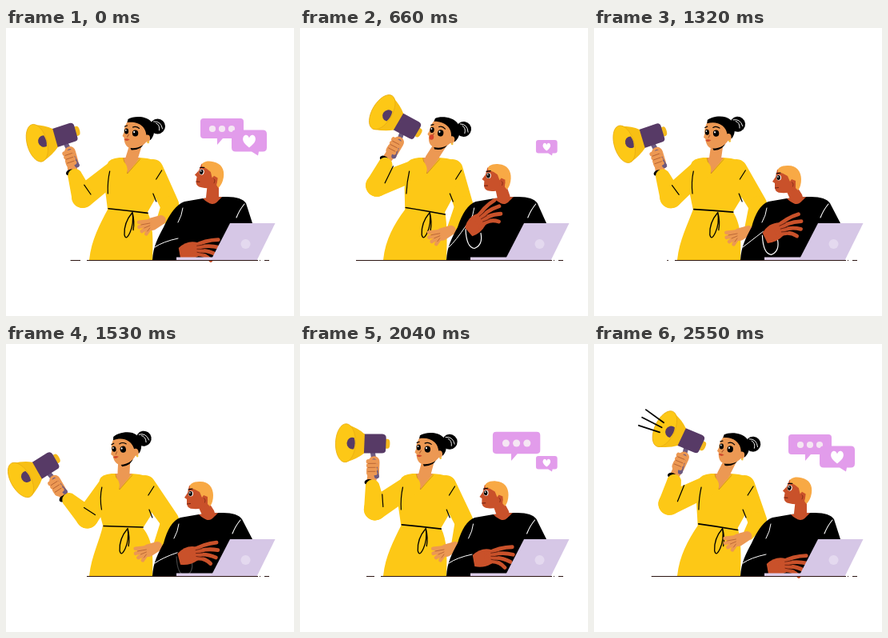
These frames come from a looping animation (360 px wide and 360 px high, 2.58 s). An HTML page:

```html
<!DOCTYPE html>
<html lang="en">
<head>
<meta charset="utf-8">
<title>Announcement</title>
<style>
html, body { margin: 0; width: 100%; height: 100%; overflow: hidden; background: #fff; }
svg { display: block; width: 100vw; height: 100vh; }
</style>
</head>
<body>
<svg id="stage" viewBox="0 0 360 360" stroke-linecap="round" stroke-linejoin="round"></svg>
<script>
const LOOP = 2580, STEP = 30, RAD = Math.PI / 180;
const INK = '#000', YELLOW = '#fdc816', PURPLE = '#573a66', SKIN = '#ec9853', FOLD = '#a8552b',
  RUST = '#c9512a', BLOND = '#f8a945', LILAC = '#d6c7e6', PINK = '#e29ceb';

// timing
const part = (t, a, b) => Math.min(1, Math.max(0, (t - a) / (b - a)));
const ramp = (t, a, b) => { const u = part(t, a, b); return u * u * (3 - 2 * u); };
const pop = u => 1 + 2.7 * (u - 1) ** 3 + 1.7 * (u - 1) ** 2;
const inOut = (t, out, gone, back, full) =>
  t < gone ? pop(1 - part(t, out, gone)) : pop(part(t, back, full));

// arm: -1 is lowest, 1 is highest; body follows but starts ahead
const armAt = t => -.4 + 1.42 * ramp(t, 0, 300) - 2.02 * ramp(t, 800, 1600) + 1.72 * ramp(t, 1740, 2260);
const bodyAt = t => armAt(t) + .6 * (1 - ramp(t, 0, 270));
const lookAt = t => 1 - ramp(t, 0, 1100) + ramp(t, 1900, 2560);
const raiseAt = t => ramp(t, 300, 640) - ramp(t, 950, 1700);

// drawing
const fill = (d, c) => `<path d="${d}" fill="${c}"/>`;
const line = (d, c = INK, w = 1.4) => `<path d="${d}" fill="none" stroke="${c}" stroke-width="${w}"/>`;
const oval = (x, y, rx, ry, c) => `<ellipse cx="${x}" cy="${y}" rx="${rx}" ry="${ry}" fill="${c}"/>`;
const place = (x, y, r, body) => `<g transform="translate(${x} ${y}) rotate(${r})">${body}</g>`;
const zoom = (x, y, s, body) => s > .01 ? `<g transform="translate(${x} ${y}) scale(${s})">${body}</g>` : '';
const fade = (o, body) => `<g opacity="${o}">${body}</g>`;
const each = (n, f) => Array.from({ length: n }, (_, i) => f(i)).join('');

// tapered limb with round ends
function limb(x1, y1, r1, x2, y2, r2, c) {
  const a = Math.atan2(y2 - y1, x2 - x1), s = Math.sin(a), k = Math.cos(a);
  return fill(`M${x1 + s * r1} ${y1 - k * r1}L${x2 + s * r2} ${y2 - k * r2}` +
    `A${r2} ${r2} 0 0 1 ${x2 - s * r2} ${y2 + k * r2}L${x1 - s * r1} ${y1 + k * r1}` +
    `A${r1} ${r1} 0 0 1 ${x1 + s * r1} ${y1 - k * r1}Z`, c);
}

function womanHead(open) {
  const mouth = open ? oval(-11.5, 8, 2.8, 3.3, '#d8432b')
    : fill('M-15 9Q-12 7 -8 9.5Q-12 12.5 -15 9Z', '#cf4a2c');
  return oval(27, -7, 9.5, 9.5, INK) +
    line('M22 -13Q31 -14 33 -4M25 -11Q30 -9 29 -2', '#fff', .9) +
    fill('M-9 -15C-15 -8 -15 -2 -15 0L-17 5L-15 7C-15 13 -13 19 -7 20C2 21 11 17 15 9L15 -8Z', SKIN) +
    fill('M-10 -16C-4 -20 12 -21 19 -13C24 -6 24 4 18 10L13 8C13 2 12 -3 8 -7C3 -12 -4 -13 -11 -12Z', INK) +
    oval(14, 8, 3.5, 4.5, SKIN) + oval(15, 13, 1.4, 1.4, '#f2c13c') +
    oval(-1, 1.5, 3.7, 4.1, INK) + oval(-12, -1, 2.6, 3.5, INK) +
    oval(-2.4, 0, 1, 1.2, '#fff') + oval(-12.8, -2.4, .8, 1, '#fff') +
    line('M-4 -6Q0 -8 4 -4.5M-14 -7L-11 -8', INK, 1.2) + line('M-9 3L-11 6', FOLD, 1) + mouth;
}

function megaphone() {
  return limb(-1, 12, 3, 5, 41, 3, '#6d5a80') +
    fill('M12 -6H17Q20 -6 20 0Q20 6 17 6H12Z', '#f4b91e') +
    fill('M-14 -11L10 -12Q15 -12 15 -7V8Q15 12 10 12L-14 13Z', PURPLE) +
    fill('M-34 -22Q-20 -18 -12 -11V13Q-20 20 -34 25Z', '#f7bf14') +
    `<ellipse cx="-35.5" cy="1" rx="12.5" ry="24" fill="${YELLOW}" stroke="#e9ae12" stroke-width=".8"/>` +
    fill('M-25 -6A7 7.3 0 1 0 -25 8Q-22.5 1 -25 -6Z', PURPLE);
}

function grip() {
  return limb(1, 23, 7, 0, 36, 8, SKIN) + limb(1, 22, 3, 5, 41, 3, '#6d5a80') +
    each(4, i => limb(-6 + i * .5, 23 + i * 5, 2.9, 3, 23 + i * 4.7, 2.7, SKIN)) +
    each(3, i => line(`M-6 ${25.5 + i * 5}L3 ${25 + i * 5}`, FOLD, .7));
}

function rays(t, x, y) {
  const lead = (t - (t < LOOP / 2 ? 300 : 2475)) / 75;
  return each(3, i => {
    const a = (216 - 9 * i) * RAD, far = 3.6 - .35 * i;
    const from = 27.5 * Math.max(0, lead - 1), to = 27.5 * Math.min(far, lead);
    if (from >= to) return '';
    const point = r => `${x - 4 - 2.5 * i + r * Math.cos(a)} ${y - 8 + 6 * i + r * Math.sin(a)}`;
    return line(`M${point(from)}L${point(to)}`, INK, 1.8);
  });
}

function hipHand(x, y) {
  return limb(x + 14, y - 5, 6, x + 3, y, 8, SKIN) +
    each(4, i => {
      const a = (190 - 27 * i) * RAD;
      return limb(x, y - 3 + i * 2.5, 3, x + 14 * Math.cos(a), y + 13 * Math.sin(a), 2.3, SKIN);
    }) +
    each(3, i => line(`M${x - 11 + i * 4} ${y + 1 + i * 4}L${x} ${y - 1 + i * 3}`, FOLD, .7));
}

function woman(t) {
  const s = armAt(t), b = bodyAt(t), d = 8.5 * b, w = d * .6;
  const mx = 90 + 43 * s, my = 125 - 15.5 * s + 12.7 * s * s, ma = 31.5 * Math.sin(1.3 * s);
  const ex = 94 - 3 * s + 5 * s * s, ey = 207 - 10 * s;
  const hx = 159.5 + 15 * b + 2 * b * b, hy = 130;
  const rx = 180 - 5 * b * b, ry = 258 - 13 * lookAt(t) ** 4;
  const sin = Math.sin(ma * RAD), cos = Math.cos(ma * RAD), kx = 157 + w, ky = 230.5;
  const gx = mx + cos - 30 * sin, gy = my + sin + 30 * cos;
  const len = Math.hypot(ex - gx, ey - gy);
  const cx = gx + (ex - gx) / len * 15 - 3, cy = gy + (ey - gy) / len * 15;

  const dress = `M104 290C107 264 117 246 ${126 + w} 227L${122 + d} 200L${125 + d} 170` +
    `Q${127 + d} 163 ${140 + d} 162H${165 + d}Q${187 + d} 163 ${193 + d} 172` +
    `L${186 + d * .5} 213L${176 + w} 230C184 246 184 264 183 290Z`;

  return limb(182 + d, 177, 13, 204, 220, 12, YELLOW) +
    limb(205, 221, 11, rx + 16, ry - 7, 7, YELLOW) +
    fill(dress, YELLOW) +
    fill(`M${145 + d} 162H${166 + d}L${150 + d} 182Z`, SKIN) +
    limb(hx + 1, hy + 12, 7.5, 155 + d, 164, 7.5, SKIN) +
    line(`M${145 + d} 163L${150 + d} 182L${166 + d} 164`, '#c98a1c', .8) +
    place(hx, hy, 9 * b - 2, fill('M-8 18Q2 20 10 14Q6 23 -6 22.5Z', INK) + womanHead(s > .9)) +
    // sash and folds
    line(`M${127 + w} ${226 - w * .3}Q${150 + w} 228 ${176 + w} ${231 + w * .4}`, INK, 1.6) +
    line(`M${kx} ${ky}q-11 13 -10 28q2 8 7 -3q5 -11 3 -25q3 12 1 22`, INK, 1.3) +
    line(`M${193 + d} 178L${186 + d} 189M${183 + d * .5} 207L${187 + d * .5} 217`, INK, 1.2) +
    hipHand(rx, ry) +
    // raised arm
    limb(137 + d, 177, 13, ex, ey, 14, YELLOW) +
    limb(cx, cy, 6, gx, gy, 6.5, SKIN) +
    place(cx, cy, Math.atan2(ey - cy, ex - cx) / RAD - 90, oval(-4, 3, 5.5, 3.6, INK)) +
    limb(ex, ey, 14, cx + (ex - cx) * .25, cy + (ey - cy) * .25, 9, YELLOW) +
    line(`M${128 + d} 179Q${125 + d} 192 ${126 + d * .8} 207`, INK, 1.2) +
    line(`M${ex + 8 + ma * .4} ${ey - 18 - ma * .2}L${ex + 10} ${ey - 3}`, INK, 1.2) +
    place(mx, my, ma, megaphone() + grip()) +
    rays(t, mx - 33 * cos, my - 33 * sin);
}

function manHead() {
  return fill('M-14 -13L-16 -4L-20 2L-17 4L-17 10Q-16 16 -9 16Q0 17 9 12L13 -4L0 -15Z', RUST) +
    fill('M-13 -10C-15 -15 -8 -18.5 0 -18C10 -18 16 -11 16 -1Q16 8 12 13L9 10V1L4 -1L2 2L-1 -5Q-7 -9 -13 -10Z', BLOND) +
    oval(5.5, 5, 3.6, 4.6, RUST) + line('M4.5 3Q7 4 5.5 8', '#7a2812', .8) +
    oval(-12, -3, 3, 3.6, '#fff') + oval(-12.4, -3, 2.3, 3, INK) + oval(-13, -4, .7, .9, '#fff') +
    line('M-15 -8L-10 -9', INK, 1.2) + line('M-16.5 10L-12.5 9.5', '#6b1d10', 1);
}

function manHand() {
  return fill('M-2 -6Q9 -16 22 -12Q28 -6 22 5Q11 11 0 8Z', RUST) +
    each(4, i => {
      const a = (-17 + 11 * i) * RAD, r = 50 - 1.2 * i * i;
      return line(`M15 ${-7 + i * 3.5}Q${32 - i} ${-15 + i * 5} ${r * Math.cos(a)} ${r * Math.sin(a)}`, RUST, 4.8);
    }) +
    each(3, i => line(`M21 ${-8 + i * 4}L29 ${-9 + i * 5.5}`, '#4d150b', .7));
}

function man(t) {
  const look = lookAt(t), up = raiseAt(t), b = 5 * (look - 1);
  const wx = 218 - 7 * up, wy = 270 + 11 * look ** 3 - 17 * up;
  const hx = 243 + 13 * look, hy = 190 - 5 * look;
  const shirt = `M183 290C184 273 190 262 197 249Q${209 + b} 222 ${223 + b} 217L${246 + b} 213` +
    `L${272 + b} 211Q${294 + b} 210 ${300 + b} 219L308 244V290Z`;
  return fill(shirt, INK) +
    fill(`M${246 + b} 213Q${258 + b} 226 ${270 + b} 211Z`, RUST) +
    limb(hx + 3, hy + 9, 7, 258 + b, 212, 8, RUST) +
    place(hx, hy, 10 * look, manHead()) +
    line(`M${298 + b} 220Q${292 + b} 227 ${288 + b} 237`, '#fff', 1.1) +
    line(`M${221 + b} 225Q${220 + b} 234 ${215 + b} 243`, '#fff', 1) +
    line(`M186 274Q${196 - 2 * up} 267 ${wx - 3} ${Math.min(wy - 7, 263)}`, '#fff', 1) +
    fade(Math.min(1, up * 2), line(`M${wx - 4} ${wy - 2}Q${wx - 3} ${wy + 21} ${wx + 7} ${wy + 22}` +
      `Q${wx + 18} ${wy + 18} ${wx + 15} ${wy + 3}`, '#fff', 1.2)) +
    place(wx, wy, -2 - 31 * up, manHand());
}

function laptop() {
  return fill('M213 286.5H260V290.5H213Z', '#dccdea') +
    fill('M280 244H336.5L313.5 290.5H256Z', LILAC) + oval(299.5, 270, 6, 6, '#e4d9ef');
}

function bubbles(t) {
  const dots = fill('M-17 -33H29Q33 -33 33 -29V-12Q33 -8 29 -8H7L0 0V-8H-17Q-21 -8 -21 -12V-29Q-21 -33 -17 -33Z', PINK) +
    each(3, i => oval(-6 + 12 * i, -20, 4.1, 4.1, '#f5e6f3'));
  const heart = fill('M-28 -32H6Q11 -32 11 -27V-10Q11 -5 6 -5H1L0 0L-8 -5H-28Q-33 -5 -33 -10V-27Q-33 -32 -28 -32Z', PINK) +
    fill('M-11 -10C-19 -16 -20 -20 -18 -24C-16 -27 -12 -26 -11 -22C-10 -26 -6 -27 -4 -24C-2 -20 -3 -16 -11 -10Z', '#fff');
  return zoom(264, 146, inOut(t, 100, 500, 1760, 2245), dots) +
    zoom(315, 159.5, inOut(t, 300, 730, 1970, 2400), heart);
}

function ground(t) {
  const x = Math.max(70, 84 - 17 * bodyAt(t));
  const left = x < 93 ? `M${x} 290.5H${x < 73 ? 101 : 93}` : '';
  return `<g stroke-linecap="butt">${line(left + 'M101 290.5H315M317 290.5H318M323 290.5H329', '#2c1512', 1.2)}</g>`;
}

const stage = document.getElementById('stage');
let shown = -1;

function tick() {
  const t = Math.floor(performance.now() % LOOP / STEP) * STEP;
  if (t !== shown) {
    shown = t;
    stage.innerHTML = woman(t) + man(t) + laptop() + bubbles(t) + ground(t);
  }
  requestAnimationFrame(tick);
}
tick();
</script>
</body>
</html>
```
